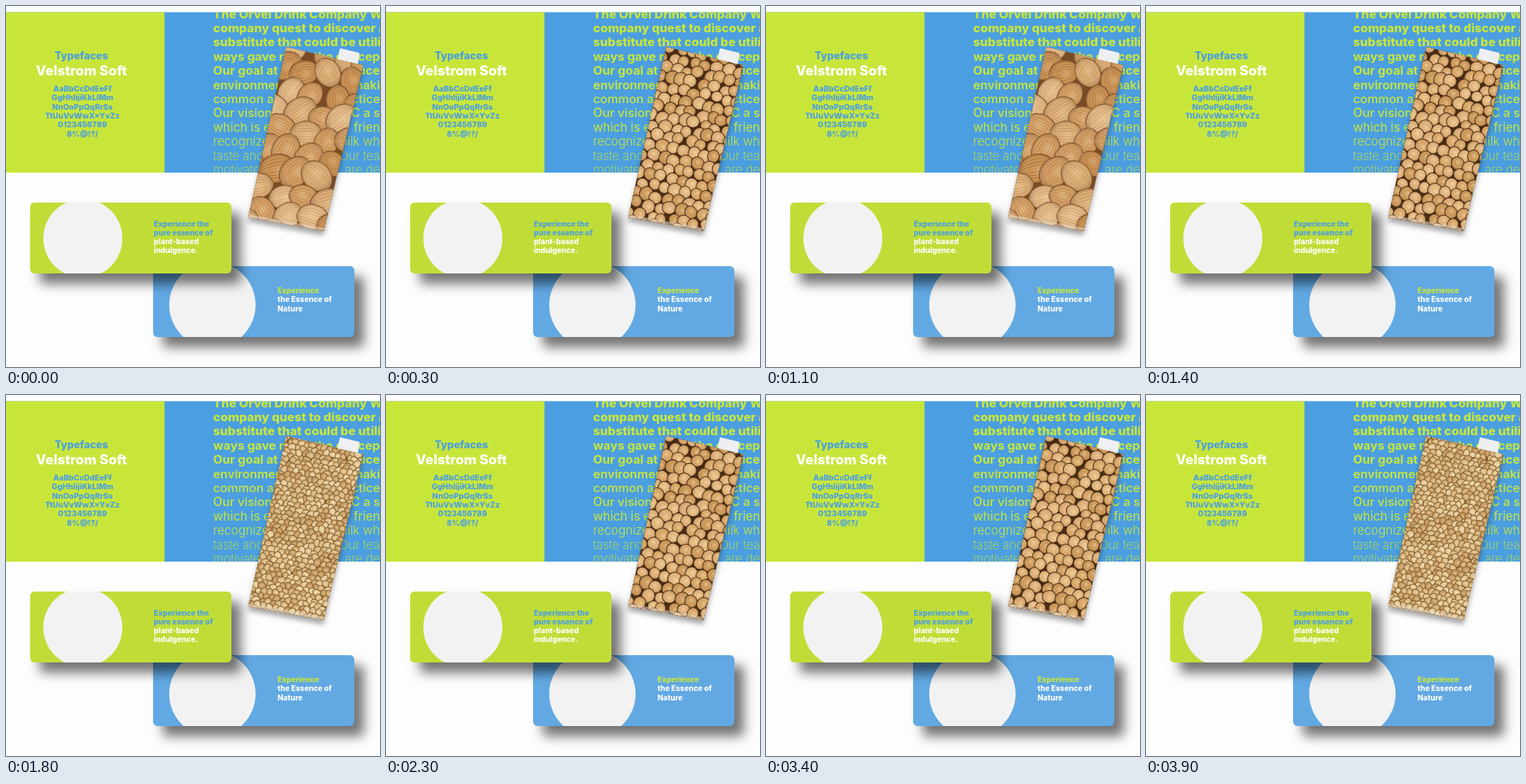
An HTML page with a canvas for the animation above (4000 ms loop, 511 px wide and 494 px high).

```html
<!DOCTYPE html>
<html lang="en">
<head>
<meta charset="utf-8">
<style>
html, body { margin: 0; width: 100%; height: 100%; overflow: hidden; background: #fdfdfd; }
canvas { display: block; }
</style>
</head>
<body>
<canvas width="511" height="494"></canvas>
<script>
const canvas = document.querySelector('canvas');
const ctx = canvas.getContext('2d');
const LIME = '#c8e63a', BLUE = '#4b9fe0', PALE = '#f2f2f2';

// Each filling: base tone, kernel tones, grid pitch, half length and half width
const fillings = [
  { base: '#7a4c26', tones: ['#cd965c', '#d8a870', '#c28748', '#dfb582'], pitch: [34, 28], size: [22, 17.5], shine: .3, fibres: 9 },
  { base: '#4a2c14', tones: ['#d9a768', '#e3b87e', '#cc9858', '#dfb077'], pitch: [15, 13.5], size: [8.8, 8], shine: .45 },
  { base: '#32170b', tones: ['#a45c2d', '#b36a37', '#8d4a22', '#ab6533'], pitch: [19, 13.5], size: [13, 8.2], shine: .2 },
  { base: '#85602f', tones: ['#d6b078', '#e6cb9a', '#c79c62', '#dcbb86'], pitch: [8, 6.5], size: [5.8, 4.2], shine: .45 }
];

const story = [
  ['The Orvel Drink Company W'],
  ['company quest to discover a'],
  ['substitute that could be utili'],
  ['ways gave rise', 'the concep'],
  ['Our goal at', 'duce'],
  ['environmen', 'maki'],
  ['common al', 'ctice'],
  ['Our vision', 'C a s'],
  ['which is ec', 'y frien'],
  ['recognize', 'milk wh'],
  ['taste and', 'Our tea'],
  ['motivate', 'are de']
];
const storyWeights = [800, 800, 800, 700, 700, 600, 500, 500, 400, 300, 200, 200];

function random(seed) {
  return () => (seed = seed * 16807 % 2147483647) / 2147483647;
}

function text(str, x, y, size, weight, color, align = 'left') {
  ctx.font = `${weight} ${size}px Inter, sans-serif`;
  ctx.fillStyle = color;
  ctx.textAlign = align;
  ctx.fillText(str, x, y);
}

function shadow(x, y, blur, alpha) {
  ctx.shadowOffsetX = x;
  ctx.shadowOffsetY = y;
  ctx.shadowBlur = blur;
  ctx.shadowColor = `rgba(0,0,0,${alpha})`;
}

function ellipse(x, y, a, b, fill) {
  ctx.beginPath();
  ctx.ellipse(x, y, a, b, 0, 0, 7);
  ctx.fillStyle = fill;
  ctx.fill();
}

function polygon(points) {
  ctx.beginPath();
  for (const [x, y] of points) ctx.lineTo(x, y);
  ctx.closePath();
}

function panels() {
  ctx.fillStyle = '#fdfdfd';
  ctx.fillRect(0, 0, 511, 494);
  ctx.fillStyle = BLUE;
  ctx.fillRect(0, 8.5, 511, 219.5);
  ctx.fillStyle = LIME;
  ctx.fillRect(0, 8.5, 216.5, 219.5);

  text('Typefaces', 103, 73, 14, 800, BLUE, 'center');
  text('Velstrom Soft', 103, 95, 18.5, 800, '#fff', 'center');
  ['AaBbCcDdEeFf', 'GgHhIijiKkLlMm', 'NnOoPpQqRrSs', 'TtUuVvWwX×YvZz', '0123456789', '8%@!?/']
    .forEach((line, i) => text(line, 104.5, 117 + i * 12.3, 10.6, 800, BLUE, 'center'));

  ctx.save();
  ctx.beginPath();
  ctx.rect(217, 8.5, 294, 219.5);
  ctx.clip();
  story.forEach(([head, tail = ''], i) => {
    const y = 16.5 + i * 19.4;
    text(head, 283, y, 16.6, storyWeights[i], LIME);
    text(tail, 511, y, 16.6, storyWeights[i], LIME, 'right');
  });
  ctx.restore();
}

function card(x, y, color, disc, textX, textY, lines) {
  ctx.save();
  ctx.beginPath();
  ctx.roundRect(x, y, 275, 97, 6);
  ctx.fillStyle = color;
  shadow(13, 14, 16, .55);
  ctx.fill();
  shadow(0, 0, 0, 0);
  ctx.clip();
  ellipse(...disc, PALE);
  ctx.restore();
  lines.forEach(([str, tone], i) => text(str, textX, textY + i * 12.3, 10.2, 800, tone));
}

function kernel(kind, x, y, rnd) {
  const [a, b] = kind.size;
  const scale = .88 + rnd() * .24;
  const shade = ctx.createRadialGradient(-a * .15, -b * .25, 0, 0, 0, a);
  shade.addColorStop(0, `rgba(255,235,200,${kind.shine})`);
  shade.addColorStop(.5, 'rgba(255,235,200,0)');
  shade.addColorStop(1, 'rgba(80,40,10,.35)');

  ctx.save();
  ctx.translate(x, y);
  ctx.rotate(rnd() * Math.PI);
  ctx.scale(scale, scale);
  ellipse(0, 0, a + .7, b + .7, kind.base);
  ellipse(0, 0, a - .3, b - .3, kind.tones[Math.floor(rnd() * 4)]);
  ellipse(0, 0, a - .3, b - .3, shade);
  ctx.lineWidth = .6;
  for (let i = 1; i < kind.fibres; i++) {
    ctx.beginPath();
    ctx.ellipse(0, 0, a, b * i / kind.fibres, 0, 0, 7);
    ctx.strokeStyle = i % 2 ? 'rgba(245,215,165,.4)' : 'rgba(120,70,30,.3)';
    ctx.stroke();
  }
  ctx.restore();
}

function carton(kind) {
  const rnd = random(4211);
  const [dx, dy] = kind.pitch;

  ctx.save();
  shadow(0, 6, 7, .35);
  polygon([[383, 56], [488, 81], [434, 308], [331, 289]]);
  ctx.fillStyle = kind.base;
  ctx.fill();
  shadow(0, 0, 0, 0);
  ctx.clip();

  ctx.save();
  ctx.transform(.98, .2, -.21, .98, 382, 56);
  for (let y = 0, row = 0; y < 262; y += dy, row++) {
    for (let x = row % 2 * dx / 2 - dx / 2; x < 125; x += dx) {
      kernel(kind, x + (rnd() - .5) * dx * .4, y + (rnd() - .5) * dy * .4, rnd);
    }
  }
  ctx.restore();

  polygon([[331, 285], [436, 304], [434, 308], [331, 289]]);
  ctx.fillStyle = 'rgba(235,225,210,.5)';
  ctx.fill();
  ctx.restore();

  polygon([[457, 59], [482, 65], [480, 78], [454, 72]]);
  ctx.fillStyle = ctx.strokeStyle = '#eeeff0';
  ctx.lineJoin = 'round';
  ctx.lineWidth = 2;
  ctx.fill();
  ctx.stroke();
}

function draw(index) {
  panels();
  card(201, 356, '#62a9e3', [282, 409, 59, 59], 371, 393,
    [['Experience', LIME], ['the Essence of', '#fff'], ['Nature', '#fff']]);
  card(33, 269, '#c0dd37', [105, 318, 54, 54], 202, 301.5,
    [['Experience the', BLUE], ['pure essence of', BLUE], ['plant-based', '#fff'], ['indulgence.', '#fff']]);
  carton(fillings[index]);
}

// Four fillings share each second, switching on 100 ms ticks
let shown = -1;
function tick() {
  const index = Math.floor(Math.floor(performance.now() % 1000 / 100) / 2.5);
  if (index !== shown) draw(shown = index);
  requestAnimationFrame(tick);
}
tick();
</script>
</body>
</html>
```
